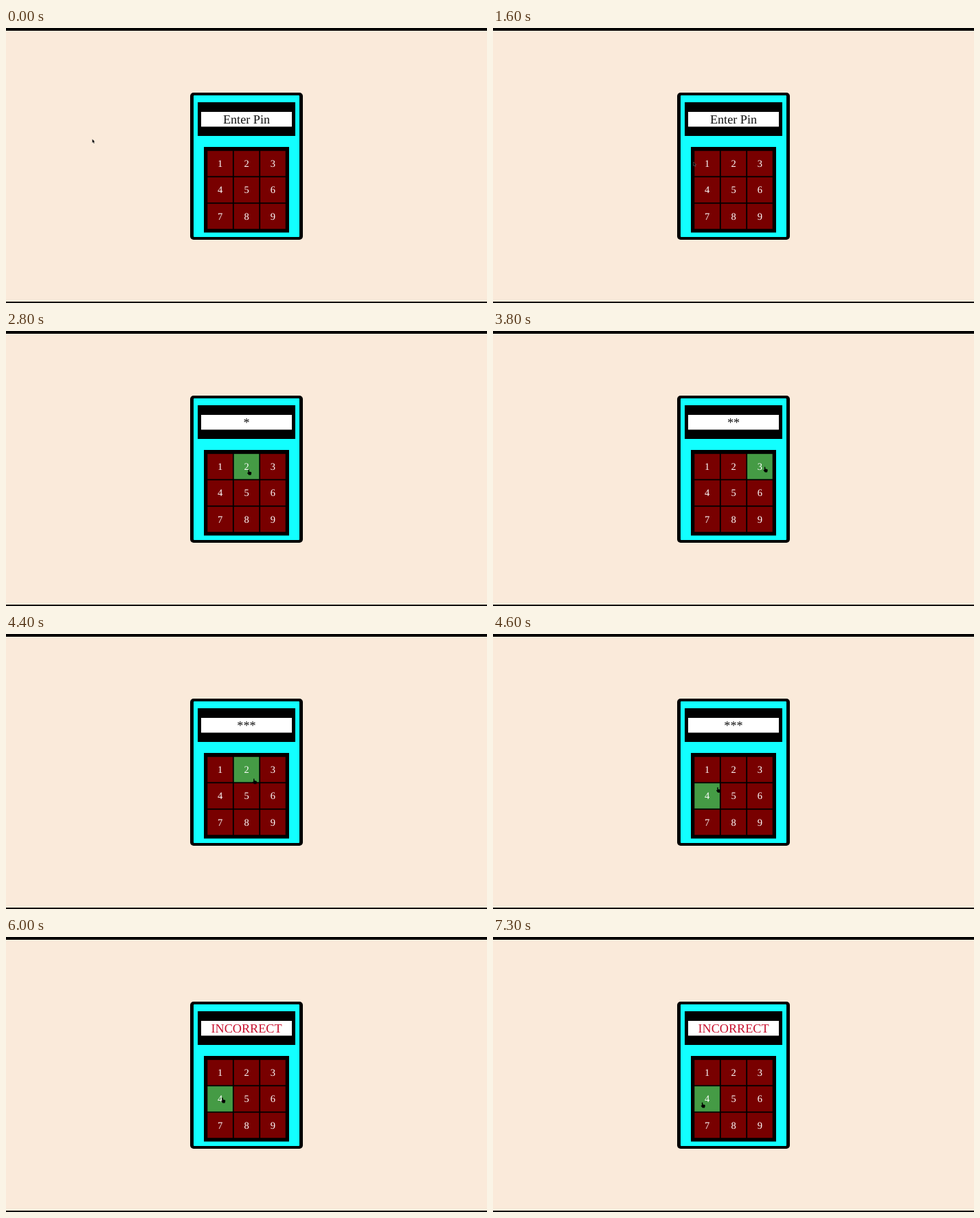
An HTML page that plays this animation: 700 by 400 pixels, repeating every 7.4 s.

```html
<!DOCTYPE html>
<html lang="en">
<head>
<meta charset="utf-8">
<title>Pin pad</title>
<style>
  html, body { margin: 0; width: 100%; height: 100%; overflow: hidden; background: #faeada; }
  svg { display: block; width: 100%; height: 100%; }
  text {
    font-family: "Liberation Serif", Times, serif;
    text-anchor: middle;
    text-rendering: geometricPrecision;
  }
  #readout { font-size: 18.2px; fill: #111; }
  #readout.wrong { fill: #c8102e; }
  .digit { font-size: 14.5px; fill: #fff; }
  .key { fill: #780000; }
  .key.hover { fill: #459b45; }
</style>
</head>
<body>
<svg viewBox="0 0 700 400">
  <rect width="700" height="400" fill="#faeada"/>
  <rect width="700" height="4"/>
  <rect y="398" width="700" height="2"/>
  <rect x="268" y="94" width="164" height="214" rx="5"/>
  <rect x="273" y="98" width="154" height="206" rx="1" fill="#12ffff"/>
  <rect x="279" y="108" width="142" height="49"/>
  <rect x="284" y="122" width="132" height="21.5" fill="#fff"/>
  <text id="readout" x="350" y="139"></text>
  <rect x="288" y="173" width="124" height="124.5"/>
  <g id="pad"></g>
  <g id="cursor">
    <path id="arrow" d="M0 0V5.6L1.3 4.4L2.3 6.6L3.3 6.1L2.3 4H4Z" stroke="#fff" stroke-width=".5" stroke-opacity=".45"/>
    <path id="hand" d="M-.6 .6Q.1-.4 .8.6V3L3.4 3.6Q4.5 3.9 4.2 5.4L3.5 8H.3L-1.9 5.2Q-2 4.2-1 4.5L-.6 4.9Z"/>
  </g>
</svg>
<script>
const LOOP = 7400, STEP = 100, SIZE = 36.6, PITCH = 38.4;
const $ = id => document.getElementById(id);

const home = { x: 125.5, y: 161.5 };
const moves = [
  { from: 1000, to: 1755, x: 312, y: 199 },
  { from: 2100, to: 2700, x: 353, y: 201.5 },
  { from: 3300, to: 3700, x: 395.5, y: 197.5 },
  { from: 4100, to: 4760, x: 315, y: 227 },
  { from: 4800, to: 5200, x: 315, y: 233.5 },
  { from: 6000, to: 6400, x: 304.5, y: 240.5 }
];
const clicks = [2100, 3000, 4000, 5300];

function add(tag, attrs) {
  const el = document.createElementNS("http://www.w3.org/2000/svg", tag);
  for (const name in attrs) el.setAttribute(name, attrs[name]);
  return $("pad").appendChild(el);
}

const keys = Array.from({ length: 9 }, (_, i) => {
  const x = 293.3 + (i % 3) * PITCH, y = 178.8 + Math.floor(i / 3) * PITCH;
  const el = add("rect", { class: "key", x, y, width: SIZE, height: SIZE });
  add("text", { class: "digit", x: x + SIZE / 2, y: y + 23 }).textContent = i + 1;
  return { x, y, el };
});

function ease(t, { from, to }) {
  const u = Math.min(1, Math.max(0, (t - from) / (to - from)));
  return u * u * (3 - 2 * u);
}

function pointerAt(t) {
  return moves.reduce((p, move) => {
    const k = ease(t, move);
    return { x: p.x + (move.x - p.x) * k, y: p.y + (move.y - p.y) * k };
  }, home);
}

const inside = (key, p) =>
  p.x >= key.x && p.x < key.x + SIZE && p.y >= key.y && p.y < key.y + SIZE;

function drawPointer(t) {
  const p = pointerAt(t);
  const over = keys.find(key => inside(key, p));
  for (const key of keys) key.el.classList.toggle("hover", key === over);
  $("cursor").setAttribute("transform", `translate(${p.x} ${p.y})`);
  $("arrow").style.display = over ? "none" : "";
  $("hand").style.display = over ? "" : "none";
}

function drawReadout(t) {
  const count = clicks.filter(c => c <= t).length;
  const wrong = count === clicks.length;
  $("readout").textContent = wrong ? "INCORRECT" : "*".repeat(count) || "Enter Pin";
  $("readout").classList.toggle("wrong", wrong);
}

const start = performance.now();
function tick() {
  const t = Math.floor((performance.now() - start) % LOOP / STEP) * STEP;
  drawPointer(t);
  drawReadout(t);
  requestAnimationFrame(tick);
}
tick();
</script>
</body>
</html>
```
